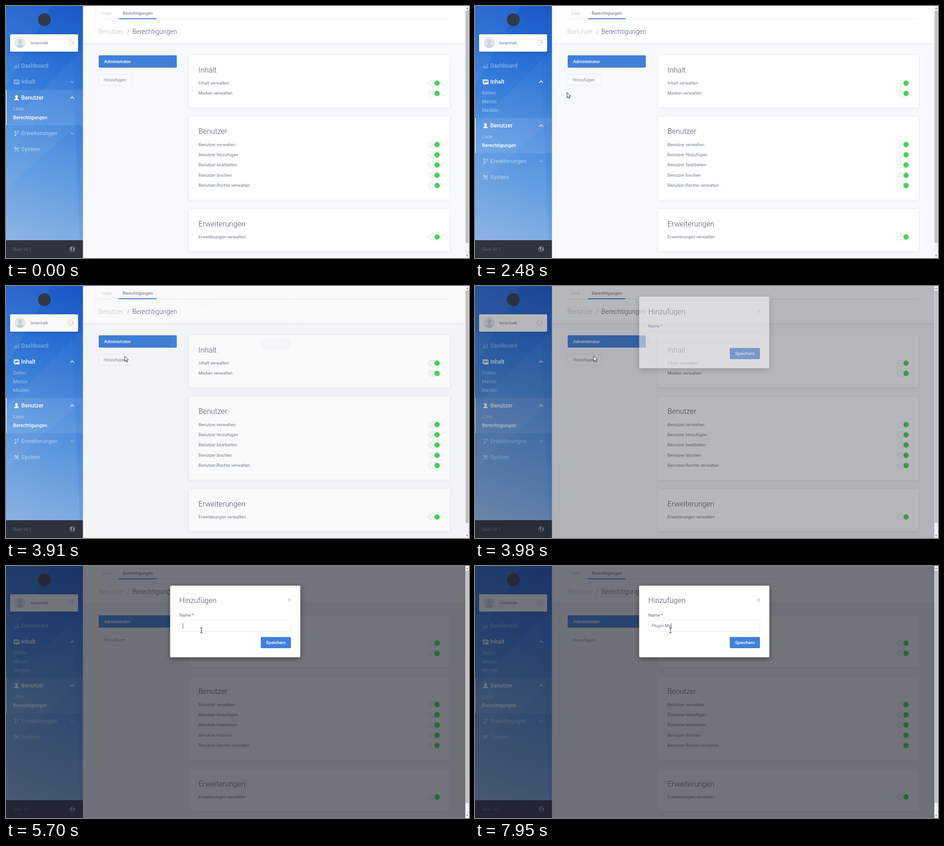
Recreate the animation shown at these times as an HTML page. Size 1014x552 px, loop 8 s.

```html
<!DOCTYPE html>
<html lang="de">
<head>
<meta charset="utf-8">
<title>Berechtigungen</title>
<style>
html, body { margin: 0; width: 100%; height: 100%; overflow: hidden; background: #f8f9fc; }
svg { display: block; width: 100vw; height: 100vh; font-family: Roboto, sans-serif; }
text { white-space: pre; }
.line { fill: none; stroke: currentColor; stroke-width: 1.3; }
.soft { filter: drop-shadow(0 1.5px 3px rgba(50, 70, 120, .1)); }
</style>
</head>
<body>
<svg id="stage" viewBox="0 0 1014 552" xmlns="http://www.w3.org/2000/svg"></svg>
<script>
const LOOP = 8000, SUB_HEIGHT = 61;
const BLUE = '#4080d8', INK = '#4f5b6c', BODY = '#737e8e', DIM = 'rgba(255,255,255,.43)';
const stage = document.getElementById('stage');

// Text is placed by the vertical centre of its capitals.
const text = (x, cy, str, size = 9.5, fill = BODY, weight = 400, extra = '') =>
  `<text x="${x}" y="${(cy + size * 0.355).toFixed(2)}" font-size="${size}" fill="${fill}" font-weight="${weight}" ${extra}>${str}</text>`;
const rect = (x, y, w, h, fill, r = 0, extra = '') =>
  `<rect x="${x}" y="${y}" width="${w}" height="${h}" rx="${r}" fill="${fill}" ${extra}/>`;
const circle = (x, y, r, fill, extra = '') =>
  `<circle cx="${x}" cy="${y}" r="${r}" fill="${fill}" ${extra}/>`;
const path = (d, extra = '') => `<path d="${d}" ${extra}/>`;
const group = (id, body, extra = '') => `<g id="${id}" ${extra}>${body}</g>`;

// Menu icons, drawn around their own centre.
const icons = {
  chart: path('M-5.5 4.5h11M-4 3v-3M-1 3v-5M2 3v-2.500M4.500 3v-8', 'class="line" stroke-width="2"'),
  photo: path('M-4 3.500H-5.500V-4.500H4V-3', 'class="line"') +
    path('M-3.500-2.500H6V5H-3.500z', 'class="line"') +
    path('M-2.500 4L0 .5 1.500 2 3.500-.5 5 2V4z', 'fill="currentColor"'),
  person: path('M-5.500 5.500Q-5.500 3-1.500 2V.8Q-3-1-3-3Q-2.800-5.500 0-5.500T3-3Q3-1 1.500.8V2Q5.500 3 5.500 5.500z', 'fill="currentColor"'),
  branch: path('M-2.500-4V5M3-3V-1Q3 1 .5 1.500T-2.500 3', 'class="line" stroke-width="1.700"') +
    circle(-2.5, -4, 1.8, 'currentColor') + circle(3, -4, 1.8, 'currentColor') + circle(-2.5, 4.3, 1.8, 'currentColor'),
  tools: path('M-4.500 4.500L3-3M-3-3L4.800 4.800', 'class="line" style="stroke-width:2"') +
    path('M-6-2.500L-2.500-5.500 0-4.500-3.500-1z', 'fill="currentColor"') +
    path('M1.500-3Q2-5.500 4.500-5.500L3.500-3.500 5.500-2.500Q5 0 2.500-1z', 'fill="currentColor"')
};

const menuItem = (id, cy, icon, label, color, chevron) =>
  group(id,
    `<g transform="translate(23 ${cy})">${icons[icon]}</g>` +
    text(33.5, cy, label, 12.24, 'currentColor', 500) +
    (chevron ? path('M-4-2L0 2L4-2', `class="line chevron" transform="translate(145 ${cy}) scale(1 ${chevron})"`) : ''),
    `style="color:${color}"`);

function sidebar() {
  return rect(0, 0, 168.5, 513, 'url(#sky)') +
    path('M0 0H100L0 175z', 'fill="#fff" opacity=".05"') +
    path('M168.500 95V250L0 400V265z', 'fill="#fff" opacity=".045"') +
    path('M145 110L168.500 95V513H162z', 'fill="#1b5cc4" opacity=".12"') +
    circle(84, 30, 14, '#30394a') +
    rect(9, 62, 149, 38, '#fff', 2, 'style="filter:drop-shadow(0 2px 4px rgba(10,40,110,.25))"') +
    `<g id="avatar" fill="#cdd4db">${circle(31, 80.5, 12, '#e8ebee')}` +
    path('M23 88.500Q23.500 85.500 28.500 84.500V82.500Q26.500 80 26.700 77Q27 73 31 73T35.300 77Q35.500 80 33.500 82.500V84.500Q38.500 85.500 39 88.500Q31 95 23 88.500z') + '</g>' +
    text(53.5, 80.5, 'toravinek', 9.5, BODY, 400, 'id="user"') +
    path('M146 76.500A5.600 5.600 0 1 0 146 83.500M140 80H148M145.800 77.800L148 80L145.800 82.200', 'fill="none" stroke="#bcc5d0"') +
    menuItem('dash', 131, 'chart', 'Dashboard', DIM) +
    menuItem('content', 166, 'photo', 'Inhalt', DIM, 1) +
    group('sub', ['Seiten', 'Menüs', 'Medien'].map((s, i) => text(15.5, 190 + 19 * i, s, 10.6, DIM, 500)).join(''),
      'clip-path="url(#fold)"') +
    group('lower',
      rect(0, 184, 168.5, 77.5, 'rgba(255,255,255,.09)') + rect(0, 184, 1.2, 77.5, '#fff') +
      menuItem('users', 201, 'person', 'Benutzer', '#fff', -1) +
      text(15.5, 225, 'Liste', 10.6, DIM, 500) +
      text(15.5, 244, 'Berechtigungen', 10.6, '#fff', 500) +
      menuItem('ext', 279, 'branch', 'Erweiterungen', DIM, 1) +
      menuItem('system', 314, 'tools', 'System', DIM)) +
    rect(0, 513, 168.5, 39, '#2f333d') +
    text(15.5, 532.5, 'Quor v0.1', 9.5, '#66707f') +
    circle(145, 532.5, 5.6, 'none', 'stroke="#8390a0" stroke-width="1.100"') +
    path('M140.500 530L143 528L146 528.500L144.500 531L145.500 533L143.500 536L142 533zM147.500 530.500L150 530V534L148 536L146.800 533z', 'fill="#8390a0"');
}

const toggle = cy =>
  rect(924.5, cy - 6.5, 26, 13, '#f7f8fb', 6.5, 'stroke="#e4e8ee"') + circle(944, cy, 5.7, '#46d158');

function card(y, h, title, rows) {
  return rect(401, y, 571, h, '#fff', 2, 'class="soft"') +
    text(421.5, y + 32, title, 16.3, INK, 300) +
    rows.map((row, i) => {
      const cy = y + 61 + 22.4 * i;
      return text(421.5, cy - 0.3, row) + toggle(cy);
    }).join('');
}

function page() {
  return rect(168.5, 0, 837.5, 552, '#f8f9fc') +
    rect(168.5, 0, 837.5, 81, '#fff', 0, 'class="soft"') +
    rect(202.5, 28, 769, 1, '#e8ecf1') + rect(247, 27, 83, 2, BLUE) +
    text(210.5, 15.5, 'Liste', 9.5, '#c0c8d1') + text(255.5, 15.5, 'Berechtigungen', 9.5, '#626e7e') +
    text(202, 55.5, 'Benutzer', 14.3, '#bcc5cf', 300) + text(265, 55.5, '/', 14.3, '#a3adb9', 300) +
    text(276.5, 55.5, 'Berechtigungen', 14.3, INK, 300) +
    rect(203, 108, 171, 27, BLUE, 2) + text(215, 121.5, 'Administrator', 9.5, '#fff', 500) +
    rect(202.8, 149.5, 72, 24, '#f9fafc', 2, 'stroke="#e6eaef"') + text(214, 161.5, 'Hinzufügen', 9.5, '#808b9a') +
    card(108, 114, 'Inhalt', ['Inhalt verwalten', 'Medien verwalten']) +
    card(242.5, 182, 'Benutzer', ['verwalten', 'hinzufügen', 'bearbeiten', 'löschen'].map(s => 'Benutzer ' + s).concat('Benutzer-Rechte verwalten')) +
    card(445, 92, 'Erweiterungen', ['Erweiterungen verwalten']);
}

function modal() {
  return rect(359.5, 43, 285, 157, '#fff', 2, 'style="filter:drop-shadow(0 3px 6px rgba(0,0,0,.4))"') +
    text(379.5, 75.5, 'Hinzufügen', 16.3, INK, 300) +
    path('M617.500 71.500L624 78M624 71.500L617.500 78', 'stroke="#c0c6ce" stroke-width="1.200"') +
    text(379.5, 107.5, 'Name *', 9.5, '#626e7e') +
    rect(380, 118.8, 244, 24.5, '#fff', 2, 'stroke="#e6eaef"') +
    text(387, 130.8, '', 9.5, BODY, 400, 'id="typed"') +
    rect(387, 125, 0.9, 12, '#4a5058', 0, 'id="caret"') +
    rect(558, 155.5, 66, 24.5, BLUE, 2) + text(569.5, 167.5, 'Speichern', 9.6, '#fff', 500);
}

stage.innerHTML = `<defs>
  <linearGradient id="sky" gradientUnits="userSpaceOnUse" x1="150" y1="0" x2="-40" y2="520">
    <stop offset="0" stop-color="#1b59c6"/><stop offset=".25" stop-color="#2a72d6"/>
    <stop offset=".6" stop-color="#5897e0"/><stop offset="1" stop-color="#94b8e4"/>
  </linearGradient>
  <clipPath id="fold"><rect id="foldBox" x="0" y="180" width="168" height="0"/></clipPath>
</defs>` +
  page() + sidebar() +
  rect(0, 0, 1006, 552, '#1c202c', 0, 'id="shade"') +
  group('modal', modal()) +
  rect(1006, 0, 8, 552, '#f1f1f1') + rect(1006.5, 10, 7, 509, '#c1c1c1') +
  path('M1008 6.500L1010 4L1012 6.500zM1008 545.500L1010 548L1012 545.500z', 'fill="#606060"') +
  path('M0 0V11.500L2.700 9L4.500 13.200L6.500 12.300L4.700 8.300H8.300z', 'id="arrow" fill="#fff" stroke="#111" stroke-width=".9"') +
  path('M-2.500-5.500Q0-5.500 0-4.500Q0-5.500 2.500-5.500M0-5V5M-2.500 5.500Q0 5.500 0 4.500Q0 5.500 2.500 5.500', 'id="beam" fill="none" stroke="#111"');

const $ = id => document.getElementById(id);
const show = (el, on) => el.setAttribute('visibility', on ? 'visible' : 'hidden');

const ticks = [0];
const run = (from, to, n) => { for (let i = 0; i < n; i++) ticks.push(from + (to - from) * i / (n - 1)); };
run(530, 1300, 11);
run(1380, 1860, 7);
ticks.push(2100, 2180, 2260, 2340, 2410, 2480, 2560, 2650);
run(2950, 3180, 4);
run(3350, 3740, 6);
ticks.push(3910, 3980);
run(4070, 4160, 2);
run(4235, 4460, 4);

// Linear interpolation over [time, value, ...] keys.
function at(keys, t) {
  let i = 0;
  while (i < keys.length - 1 && keys[i + 1][0] <= t) i++;
  const a = keys[i], b = keys[i + 1];
  if (!b || t <= a[0]) return a.slice(1);
  const p = (t - a[0]) / (b[0] - a[0]);
  return a.slice(1).map((v, k) => v + (b[k + 1] - v) * p);
}

const pointer = [
  [530, 687, 330], [800, 490, 262], [1060, 290, 200], [1300, 166, 172], [1460, 146, 167], [2100, 148, 160],
  [2260, 136, 92], [2340, 158, 122], [2480, 201.5, 189.5], [2650, 223, 201], [2950, 226, 197],
  [3180, 238, 164], [3350, 241, 161], [3740, 260, 153.5], [4160, 260, 153.5], [4460, 428, 141]
];
const shadeKeys = [[3900, 0], [3910, 0.03], [3980, 0.52], [4070, 1]];
const hoverKeys = [[2180, 0], [2340, 1], [2480, 0.8], [2650, 0]];
const keystrokes = [5780, 5950, 6250, 6420, 6480, 6640, 7190, 7480, 7950];

function draw(ms) {
  const t = ticks.filter(k => k <= ms).pop();

  const open = 1 - (1 - Math.min(1, Math.max(0, (t - 1460) / 400))) ** 2;
  $('foldBox').setAttribute('height', SUB_HEIGHT * open);
  $('lower').setAttribute('transform', `translate(0 ${SUB_HEIGHT * open})`);
  $('content').style.color = `rgba(255,255,255,${0.43 + 0.57 * open})`;
  $('content').querySelector('.chevron').setAttribute('transform', `translate(145 166) scale(1 ${1 - 2 * open})`);

  const [hover] = at(hoverKeys, t);
  $('user').setAttribute('fill', `rgb(${115 - 51 * hover},${126 + 2 * hover},${142 + 74 * hover})`);
  $('avatar').firstChild.setAttribute('fill', `rgb(${232 - 14 * hover},${235 - 6 * hover},${238 + 4 * hover})`);

  const [fade] = at(shadeKeys, t);
  $('shade').setAttribute('opacity', 0.62 * fade);
  $('modal').setAttribute('opacity', fade);
  $('modal').setAttribute('transform', `translate(0 ${-41 * (1 - fade)})`);

  const [x, y] = at(pointer, t);
  const overField = x > 380 && t > 4160;
  for (const id of ['arrow', 'beam']) $(id).setAttribute('transform', `translate(${x} ${y})`);
  show($('arrow'), t >= 530 && !overField);
  show($('beam'), overField);

  const typed = $('typed');
  typed.textContent = 'Plugin Ma'.slice(0, keystrokes.filter(k => k <= ms).length);
  $('caret').setAttribute('x', 387 + (typed.textContent ? typed.getComputedTextLength() : 0));
  show($('caret'), (ms >= 4690 && ms < 5250) || ms >= 5700);
}

const start = performance.now();
function loop() {
  draw((performance.now() - start) % LOOP);
  requestAnimationFrame(loop);
}
loop();
</script>
</body>
</html>
```
